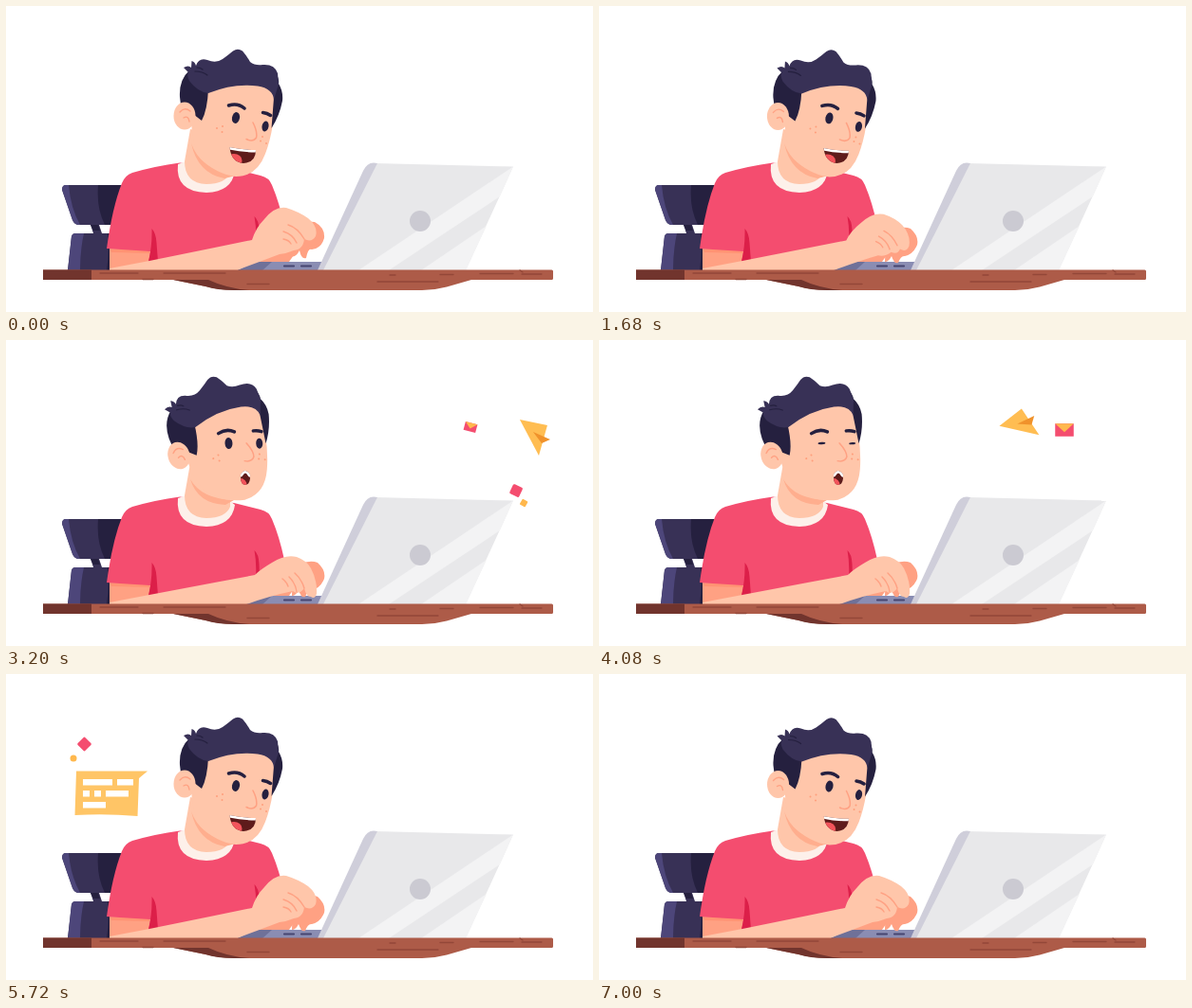
Animation, 618 px wide and 323 px high, one loop 7040 ms. Source, as an HTML page:

```html
<!DOCTYPE html>
<html lang="en">
<head>
<meta charset="utf-8">
<title>At the laptop</title>
<style>
html, body { margin: 0; width: 100%; height: 100%; overflow: hidden; background: #fff; }
svg { display: block; width: 100%; height: 100%; }
.line { fill: none; stroke-linecap: round; stroke-linejoin: round; }
</style>
</head>
<body>
<svg viewBox="0 0 618 323">
  <defs><clipPath id="mouthClip"><path id="mouthEdge"/></clipPath></defs>

  <!-- chair -->
  <path fill="#383156" d="M63 189H125V231H77Q72 231 70 226L59 194Q59 189 63 189M73 240H126V279H65L69 243Q70 240 73 240M89 231H98L101 240H92Z"/>
  <path fill="#25203f" d="M97 189H125V231H104Q95 213 97 189M107 240H126V279H106Q109 260 107 240M89 231H97L99 237H92Z"/>
  <path fill="#4d467a" d="M63 189H66Q68 213 78 231H77Q72 231 70 226L59 194Q59 189 63 189M73 240H82Q78 258 78 279H65L69 243Q70 240 73 240"/>

  <!-- flying things -->
  <g id="plane">
    <path fill="#ffbd52" d="M-17-15L12-9L3 23Z"/>
    <path fill="#f0922b" d="M-3-2L15 6L6 10Z"/>
  </g>
  <g id="mail">
    <path fill="#f44d6f" d="M-6.5-4.5H6.5V4.5H-6.5Z"/>
    <path fill="#ffb84d" d="M-6.5-4.5H6.5L0 1.5Z"/>
  </g>
  <rect id="bitPink" x="-5.5" y="-5.5" width="11" height="11" rx="1.5" fill="#f44d6f"/>
  <rect id="bitGold" x="-3.3" y="-3.3" width="6.6" height="6.6" rx="1" fill="#ffb84d"/>
  <circle id="spark" r="4" fill="#ffb84d"/>
  <path id="burst" class="line" stroke="#f44d6f"/>
  <path id="streak" class="line" stroke="#ffc566" stroke-width="5.2" pathLength="1" d="M190 60Q178 106 139 107.5"/>
  <g id="note">
    <path id="bubble" fill="#ffc566"/>
    <g id="text" fill="#fff"></g>
  </g>
  <rect id="gem" x="-5.6" y="-5.6" width="11.2" height="11.2" rx="1.5" fill="#f44d6f"/>
  <circle id="dot" r="3.5" fill="#ffb84d"/>

  <!-- body -->
  <path fill="#ffa183" d="M109 256H153V279H109Z"/>
  <path fill="#ff9373" d="M110 257H151V261L111 260Z"/>
  <path fill="#f44d6f" d="M106 256Q112 212 122 187Q125 179 133 176Q157 169 183 165.5L240 172L268 179Q277 181 280 189Q288 208 293 232V262L255 272L150 270L152 259Z"/>
  <path fill="#dc1f49" d="M153.5 235Q158 240 158.5 250L160 270H150Q154 253 153.5 235M261.5 222Q266 226 266.5 236L267 251H263Q264 236 261.5 222"/>
  <path fill="#fdf0ea" d="M181 167Q178 196 211 197Q238 196 241 174L236 170L190 164Z"/>
  <path fill="#ffc6aa" d="M194 130L188 164Q188 187 211 188Q231 188 236 176V140Z"/>
  <path id="shade" fill="#ffae8e"/>

  <!-- hands and laptop -->
  <path fill="#6f7199" d="M262 270H333L329 279H243Z"/>
  <path fill="#8a8db3" d="M280 270H333L329 279H270Z"/>
  <path class="line" stroke="#474671" stroke-width="2.2" d="M293 274.5H303M311 274.5H321"/>
  <path fill="#ffa183" d="M275 250L305 240V260L298 270H267Z"/>
  <path id="farHand" fill="#ffa183"/>
  <path id="arm" fill="#ffc6aa"/>
  <path id="fingers" class="line" stroke="#ffa183" stroke-width="1.4"/>
  <path fill="#e8e8ea" d="M388 166L534 169.5L484 279H332Z"/>
  <path fill="#f3f3f4" d="M534 169.5L520 201L403 279H371ZM506 232L484 279H437Z"/>
  <path fill="#cfceda" d="M328 279L376 174Q380 165.5 387 165.5L391 166L334 279Z"/>
  <circle cx="436" cy="227" r="11" fill="#cbcad2"/>

  <!-- head -->
  <g id="head">
    <path fill="#ffc6aa" d="M205 90Q245 66 284 88Q283 130 273 156Q264 180 242 180Q220 177 204 160Q195 146 195 115Z"/>
    <path fill="#25203f" d="M193 68Q182 78 183 96L184 104L206 121Q212 110 213 88L204 72ZM284 70Q288 78 287 82Q292 90 291 100Q288 116 279.5 129L282 97Z"/>
    <path fill="#383156" d="M213 92Q202 91 193 79Q190 73 192 70L187 65Q192 62 195 65L195.500 58Q199 59 200 63Q203 54 212 57Q221 61 228 56Q235 51 239 47.500Q244 44 249 47.500Q253 52 257 59Q262 63 270 62Q283 61 286 71L287 83Q284 92 282 99Q281 87 265 84.500Q240 81 213 92Z"/>
    <path class="line" stroke="#25203f" stroke-width="1.200" d="M201 65Q205 65 207 67M199 69Q207 69 212 73"/>
    <ellipse cx="188" cy="116" rx="11.500" ry="14.500" fill="#ffc6aa"/>
    <path class="line" stroke="#ffa183" stroke-width="1.400" d="M183 112Q188 106 194 111M187 118Q192 115 193 122"/>
    <path class="line" stroke="#25203f" stroke-width="3.500" d="M234.500 105Q244 102 251 108M270.500 112.500Q275 113 278.500 115.500"/>
    <ellipse id="eyeL" rx="4" ry="6" fill="#25203f"/>
    <ellipse id="eyeR" rx="3.500" ry="5.500" fill="#25203f"/>
    <path class="line" stroke="#ffa183" stroke-width="1.500" d="M260 123Q265 133 263.500 139Q260 144 253 140.500"/>
    <path class="line" stroke="#ff9f7c" stroke-width="2" d="M222 129h.01M228 127h.01M227.500 133h.01M268 142.500h.01M270 138h.01M274 145h.01"/>
    <path id="mouth" fill="#5e1b1b"/>
    <g clip-path="url(#mouthClip)">
      <ellipse cx="240" cy="163" rx="8.500" ry="7" fill="#f2545b"/>
      <path id="teeth" class="line" stroke="#fff" stroke-width="5"/>
    </g>
  </g>

  <!-- table -->
  <path fill="#ad5b48" d="M39 278.500H574.500Q576 278.500 576 280V287.500Q576 289 574.500 289H490L464 296.500Q451 300 438 300H250Q225 300 215 297L176 289H39Z"/>
  <path fill="#71342d" d="M39 278.500H90V289H39ZM176 289H213Q232 298 256 300H240Q222 300 210 296Z"/>
  <path class="line" stroke="#934738" stroke-width="1.300" d="M99 282H139M144 288.500H155M166 282H231M254 293.500H277M391 291H455M404 284H410M457 283.500H471M499 282.500H534M541 279L544 281M543 283H564"/>
</svg>
<script>
const LOOP = 7040, BEAT = 270;
const el = id => document.getElementById(id);
const set = (id, name, value) => el(id).setAttribute(name, value);
const clamp = x => Math.max(0, Math.min(1, x));
const part = (t, a, b) => clamp((t - a) / (b - a));
const smooth = x => x * x * (3 - 2 * x);
const out = x => 1 - (1 - x) * (1 - x);
const ramp = (t, a, b) => smooth(part(t, a, b));
const wave = x => (1 - Math.cos(x * 2 * Math.PI)) / 2;

// Blend two paths with the same commands
const number = /-?\d+(\.\d+)?/g;
function mix(a, b, k) {
  const ends = b.match(number);
  let i = 0;
  return a.replace(number, n => +n + (ends[i++] - n) * k);
}

// Smooth curve through rows of [time, ...values]
function along(t, rows) {
  let i = 0;
  while (i < rows.length - 2 && t > rows[i + 1][0]) i++;
  const a = rows[i], b = rows[i + 1], k = part(t, a[0], b[0]);
  const before = rows[i - 1] || a, after = rows[i + 2] || b;
  return a.slice(1).map((v, j) => {
    const p = before[j + 1], q = b[j + 1], r = after[j + 1];
    return v + .5 * k * (q - p + k * (2 * p - 5 * v + 4 * q - r + k * (3 * (v - q) + r - p)));
  });
}

function place(id, x, y, turn = 0, size = 1) {
  set(id, "transform", `translate(${x} ${y}) rotate(${turn}) scale(${size})`);
}

const ARM_UP = "M109 279L109 277L151 269L259 247Q263 234 272 225Q283 211 295 213Q308 217 318 224Q329 233 326 243Q322 250 314 246Q313 257 303 258Q296 261 288 262Q272 268 243 279Z";
const ARM_DOWN = "M109 279L109 277L151 269L262 248Q268 242 280 235Q294 226 306 229Q317 233 321 241Q328 254 327 268Q325 274 321 271Q316 271 314 262Q308 270 302 265Q278 270 253 279Z";
const FINGERS_UP = "M297 231Q307 234 314 246M292 238Q302 241 306 250M292 246Q298 247 300 251";
const FINGERS_DOWN = "M304 246Q311 252 314 262M298 250Q305 257 306 266M291 252Q296 256 297 260";
const FAR_UP = "M302 236Q315 226 325 228Q336 234 335 245Q332 256 322 257Q318 255 316 266Q311 268 309 258Q305 266 300 264Z";
const FAR_DOWN = "M302 240Q318 231 328 235Q337 243 335 252Q331 262 322 264Q318 263 315 271Q311 273 308 264Q305 270 301 270Z";
const MOUTH_OPEN = "M235.5 149Q249 152 263 152Q263 165 250 166Q237 165 235.5 149";
const MOUTH_HALF = "M237 150.5Q249 153 262 152.5Q261 164 250 165Q238 163 237 150.5";
const MOUTH_O = "M245 153Q252 147 254.6 156Q252 166.6 246.7 165Q241.4 163.6 245 153";
const SHADE_LOW = "M195 145Q204 172 242 179L230 182Q202 177 195 145Z";
const SHADE_HIGH = "M194 147Q206 168 240 169L231 174Q202 173 194 147Z";
const BOX = "M131 102L147 102L146 105L146 113Q139 113 131 113Z";
const BUBBLE = "M74 102.5L149 102.5L140 110L138.5 150Q105 147 72.5 149Z";

const BARS = [[81, 111, 31], [117, 111, 17], [81, 123, 7], [93, 123, 7], [105, 123, 24], [81, 135, 24]];
const bars = BARS.map(([x, y]) => {
  const bar = document.createElementNS("http://www.w3.org/2000/svg", "rect");
  bar.setAttribute("x", x);
  bar.setAttribute("y", y);
  bar.setAttribute("height", 6.5);
  el("text").append(bar);
  return bar;
});

const FLIGHT = [[2960, 530, 168, 85], [3080, 568, 140, 55], [3200, 558, 99, 0], [3640, 532, 80, -35],
  [3800, 532, 80, -40], [4120, 430, 88, -50], [4400, 310, 84, -42], [4600, 225, 85, -45]];

function drawPerson(t) {
  const beat = t < 2400 ? t / BEAT : (t - 5720) / BEAT;
  const typing = t < 2295 || t > 5045;
  const settle = t < 2400 ? 1 - ramp(t, 2080, 2320) : 1;
  const lift = t > 6530 ? 1 : typing ? (1 - wave(beat)) * settle : 0;
  const farLift = t < 1485 ? 1 - wave(beat) : t > 5180 && t < 5720 ? wave(beat) : 0;
  const bob = t < 2160 || t > 5180 ? wave(beat) : 0;
  const turn = ramp(t, 2960, 3160) - ramp(t, 4500, 4690);
  const lid = 1 - .9 * wave(part(t, 3960, 4160));

  set("arm", "d", mix(ARM_DOWN, ARM_UP, lift));
  set("fingers", "d", mix(FINGERS_DOWN, FINGERS_UP, lift));
  set("farHand", "d", mix(FAR_DOWN, FAR_UP, farLift));
  set("shade", "d", mix(SHADE_LOW, SHADE_HIGH, turn));
  set("head", "transform", `translate(${bob - 6 * turn} ${bob + 6 * turn}) rotate(${-16 * turn} 188 116)`);
  set("eyeL", "transform", `translate(242 118) rotate(12) scale(1 ${lid})`);
  set("eyeR", "transform", `translate(273 127) rotate(12) scale(1 ${lid})`);

  const mouth = mix(mix(MOUTH_OPEN, MOUTH_HALF, bob), MOUTH_O, turn);
  set("mouth", "d", mouth);
  set("mouthEdge", "d", mouth);
  set("teeth", "d", mouth.split("Q").slice(0, 2).join("Q"));
}

function drawFlight(t) {
  const [x, y, angle] = along(t, FLIGHT);
  place("plane", x, y, angle, t < 4600 ? part(t, 2950, 3040) : 0);

  const rise = out(part(t, 2960, 3200)), hover = ramp(t, 3200, 3640);
  place("mail", 515 - 26 * rise + hover, 172 - 80 * rise + 3 * hover, 15 - 15 * hover,
    t < 4540 ? rise * (1 + .5 * hover) : 0);

  const fall = part(t, 2980, 3640), s = fall * 3;
  const size = t > 2980 ? 1 - part(fall, .55, 1) : 0;
  place("bitPink", 524 + 13 * s, 170 - 25 * s + 14 * s * s, 25 * s, size);
  place("bitGold", 526 + 19 * s, 173 - 12 * s + 11 * s * s, 30 * s, size);

  const drift = out(part(t, 4400, 4800));
  place("spark", 455 - 34 * drift, 104 + 17.5 * drift, 0, ramp(t, 4400, 4560) - ramp(t, 4800, 5080));

  const p = part(t, 4560, 5120), far = 31 * out(p), near = far - 5.5 * Math.sin(p * Math.PI);
  set("burst", "d", `M490 ${95 - near}V${95 - far}M490 ${95 + near}V${95 + far}M${490 - near} 95H${490 - far}M${490 + near} 95H${490 + far}`);
  set("burst", "stroke-width", p > 0 ? 5 * (1 - p ** 4) : 0);
}

function drawNote(t) {
  const front = part(t, 4560, 4700), tail = part(t, 4653, 4833), length = front - tail;
  set("streak", "stroke-dasharray", `${length} 2`);
  set("streak", "stroke-dashoffset", -tail);
  set("streak", "visibility", length > .01 ? "visible" : "hidden");

  const leave = ramp(t, 5960, 6480), size = t > 4670 ? 1 - leave : 0;
  set("bubble", "d", mix(BOX, BUBBLE, out(part(t, 4720, 5040))));
  set("note", "transform", `translate(${37 * leave} ${126 * leave}) scale(${size})`);
  bars.forEach((bar, i) => bar.setAttribute("width", BARS[i][2] * ramp(t, 5000 + 80 * i, 5200 + 80 * i)));

  place("gem", 82.5, 74, 45, ramp(t, 5000, 5300) - ramp(t, 6560, 6840));
  place("dot", 71, 89, 0, ramp(t, 4960, 5160) - ramp(t, 6680, 6960));
}

const start = performance.now();
function tick() {
  const t = (performance.now() - start) % LOOP;
  drawPerson(t);
  drawFlight(t);
  drawNote(t);
  requestAnimationFrame(tick);
}
tick();
</script>
</body>
</html>
```
